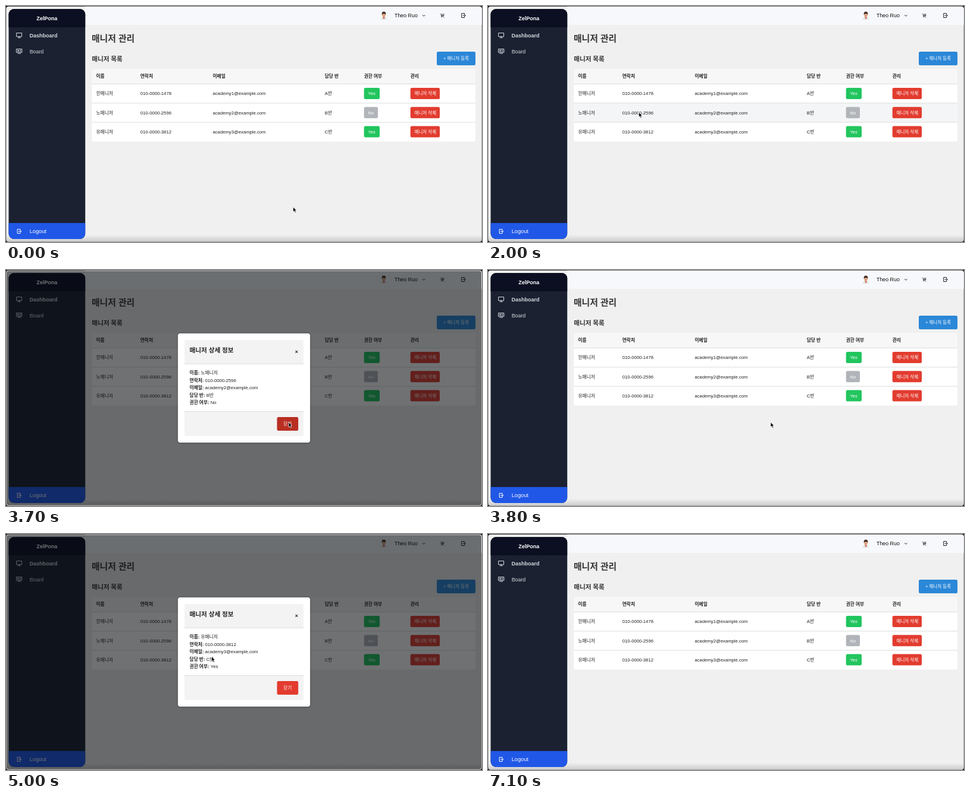
Recreate the animation shown at these times as an HTML page. Size 800 px wide and 398 px high, loop 7200 ms.

```html
<!DOCTYPE html>
<html lang="ko">
<head>
<meta charset="utf-8">
<title>매니저 관리</title>
<style>
  html, body { margin: 0; width: 100%; height: 100%; overflow: hidden; background: #000; }
  svg { display: block; width: 100vw; height: 100vh; }
  text { font: 7.7px "Liberation Sans", "Noto Sans CJK KR", "Noto Sans CJK", sans-serif; fill: #222; white-space: pre; }
  .bold { font-weight: 700; }
  .title { font-size: 14.8px; fill: #333; }
  .sub { font-size: 10.6px; }
  .nav { font-size: 9px; fill: #d3d8e0; }
  .user { font-size: 8.85px; fill: #111; }
  .btn { font-size: 7.5px; font-weight: 500; fill: #fff; }
  .line { stroke: #dcdcdc; stroke-width: 1; }
  .icon { fill: none; stroke-width: 1; stroke-linejoin: round; stroke-linecap: round; }
  #modal { visibility: hidden; }
  #box { filter: drop-shadow(0 1px 2px rgba(0, 0, 0, .15)); }
</style>
</head>
<body>
<svg viewBox="0 0 800 398" preserveAspectRatio="none">
  <defs>
    <linearGradient id="shade" x2="0" y2="1">
      <stop offset="0" stop-color="#000" stop-opacity="0"/>
      <stop offset="1" stop-color="#000" stop-opacity=".16"/>
    </linearGradient>
    <clipPath id="window"><rect x=".3" y=".7" width="799.4" height="397" rx="4"/></clipPath>
    <clipPath id="side"><rect x="4.5" y="5" width="128.7" height="388" rx="9"/></clipPath>
    <clipPath id="table"><rect x="144.5" y="106" width="644.5" height="122.5" rx="4"/></clipPath>
    <g id="exit" class="icon">
      <path d="M2-2V-3.5H-2.9V3.5H2V2M-.7 0H3.5M2.1-1.5 3.5 0 2.1 1.5"/>
    </g>
  </defs>

  <g clip-path="url(#window)">
    <rect width="800" height="398" fill="#f0f0f0"/>
    <rect x="133" width="667" height="32" fill="#f7f8fb"/>
    <rect y="386" width="800" height="12" fill="url(#shade)"/>

    <g clip-path="url(#side)">
      <rect width="134" height="398" fill="#1b2130"/>
      <rect width="134" height="36" fill="#0b0f21"/>
      <rect y="366" width="134" height="32" fill="#2057e7"/>
    </g>
    <text class="nav bold" x="68.8" y="23.8" text-anchor="middle" style="fill:#fff">ZelPona</text>
    <text class="nav bold" x="39.5" y="52.8">Dashboard</text>
    <text class="nav" x="39.7" y="79.7" style="font-size:8.85px">Board</text>
    <text class="nav" x="39.7" y="383.2" style="font-size:9.2px;fill:#fff">Logout</text>
    <g class="icon" stroke="#d3d8e0">
      <path d="M18 45.5H26.5V51.5H18ZM22.2 51.5V53.5M20 53.5H24.5"/>
      <path d="M17.8 72.5H26.8V78.3H17.8ZM20 74.5H21.5V76.3H20ZM23.3 74.4H25M23.3 76.4H25M20 80H24.6"/>
    </g>
    <use href="#exit" x="22" y="380" stroke="#fff"/>

    <path d="M629.8 22.7Q630 18.7 635 18.7T640.2 22.7Z" fill="#dfe6e4"/>
    <path d="M633.2 18.6H636.8L635 22.8Z" fill="#c9584c"/>
    <ellipse cx="635" cy="15.2" rx="2.8" ry="3.6" fill="#dfa581"/>
    <path d="M631.8 15Q630.8 9.4 635 9.4T638.2 15Q637.8 13 635 13.1T631.8 15Z" fill="#3f2f28"/>
    <text class="user" x="653" y="19.3">Theo Ruo</text>
    <g class="icon" stroke="#222">
      <path d="M700.4 15.3 702.3 17.2 704.2 15.3"/>
      <path d="M730 13 736.2 19.2M733.4 13 732.6 14.1M736 13.2 733.6 15.3H736.4L735.2 16.8M731 16H732.8L731.8 19 733.4 17.6" stroke-width=".85"/>
    </g>
    <use href="#exit" x="768.6" y="16" stroke="#222"/>

    <text class="title bold" x="144" y="59.6">매니저 관리</text>
    <text class="title sub bold" x="144.2" y="92.5">매니저 목록</text>
    <rect x="724" y="77" width="65" height="23" rx="2.5" fill="#2b87d8"/>
    <text class="btn" x="735" y="91.2">+ 매니저 등록</text>

    <g clip-path="url(#table)">
      <rect x="144" y="106" width="646" height="123" fill="#fff"/>
      <rect x="144" y="106" width="646" height="25.5" fill="#f7f7f7"/>
      <g id="rows"></g>
    </g>
  </g>

  <g id="modal">
    <rect x="1" y="1.4" width="798" height="395.4" rx="4" fill="#080c0e" fill-opacity=".58"/>
    <rect id="box" x="289" y="107" width="222" height="184" rx="4" fill="#fff"/>
    <path d="M300 118H500V158H300ZM300 239H500V280H300Z" fill="#f3f3f3"/>
    <path class="line" d="M300 158.3H500M300 238.7H500"/>
    <text class="sub bold" x="308.5" y="139.2">매니저 상세 정보</text>
    <text class="bold" x="488.3" y="141" text-anchor="middle" style="font-size:8.8px">×</text>
    <g id="info"></g>
    <rect id="close" x="455.5" y="248" width="35.7" height="23" rx="2.5"/>
    <text class="btn" x="473.3" y="262.4" text-anchor="middle" style="font-size:7.7px">닫기</text>
  </g>

  <path id="cursor" d="M0 0V8.2L1.9 6.5 3.3 9.6 4.8 8.9 3.4 5.9H6Z" fill="#000" stroke="#fff" stroke-width=".7"/>
</svg>

<script>
const LOOP = 7200, STEP = 100;
const heads = ["이름", "연락처", "이메일", "담당 반", "권한 여부", "관리"];
const cols = [151.5, 225.8, 347.5, 535.8, 601.7, 679.7];
const people = [
  ["한매니저", "010-0000-1478", "academy1@example.com", "A반", "Yes"],
  ["노매니저", "010-0000-2596", "academy2@example.com", "B반", "No"],
  ["유매니저", "010-0000-3812", "academy3@example.com", "C반", "Yes"]
];
const ROW_TOP = 131.5, ROW_H = 32.3;
// open time, close time, person shown
const visits = [[2100, 3800, 1], [4900, 6200, 2]];
// start, end, then where the pointer goes
const moves = [
  [400, 1800, 253.5, 179.3],
  [2500, 3500, 475, 256.8],
  [3900, 4700, 345.5, 206.8],
  [5100, 5900, 474, 260.3],
  [6300, 7000, 480, 408]
];
const $ = id => document.getElementById(id);
const text = (x, y, s, cls = "") => `<text class="${cls}" x="${x}" y="${y}">${s}</text>`;
const button = (x, y, w, color, label) =>
  `<rect x="${x}" y="${y - 9.5}" width="${w}" height="19" rx="2.5" fill="${color}"/>` +
  text(x + 6.8, y + 2.8, label, "btn");

function row(p, i) {
  const top = ROW_TOP + i * ROW_H, mid = top + 16;
  const yes = p[4] === "Yes";
  return `<rect class="row" x="144" y="${top}" width="646" height="${ROW_H}"/>` +
    `<path class="line" d="M144 ${top}H790"/>` +
    p.slice(0, 4).map((s, c) => text(cols[c], mid + 2.8, s)).join("") +
    button(cols[4], mid, yes ? 26.3 : 23.3, yes ? "#22c55e" : "#b1b5ba", p[4]) +
    button(cols[5], mid, 49.3, "#e23c2f", "매니저 삭제");
}

$("rows").innerHTML = people.map(row).join("") +
  heads.map((s, c) => text(cols[c], 121.2, s, "bold")).join("");
const rows = document.querySelectorAll(".row");

const details = p => p.map((s, i) =>
  text(308.6, 176.3 + i * 12.45, `<tspan class="bold">${heads[i]}:</tspan> ${s}`)).join("");

const ease = u => u * u * (3 - 2 * u);

function pointer(t) {
  let x = 482.5, y = 339;
  for (const [from, to, tx, ty] of moves) {
    const k = ease(Math.min(1, Math.max(0, (t - from) / (to - from))));
    x += (tx - x) * k;
    y += (ty - y) * k;
  }
  return [x, y];
}

let shown = -1;
function draw(now) {
  const t = Math.floor(now % LOOP / STEP) * STEP;
  const [x, y] = pointer(t);
  const visit = visits.find(v => t >= v[0] && t < v[1]);
  $("cursor").setAttribute("transform", `translate(${x} ${y})`);
  $("modal").style.visibility = visit ? "visible" : "hidden";
  if (visit && shown !== visit[2]) {
    shown = visit[2];
    $("info").innerHTML = details(people[shown]);
  }
  const over = x > 455 && x < 491 && y > 248 && y < 271;
  $("close").setAttribute("fill", over ? "#b92e22" : "#e23c2f");
  const hover = visit ? -1 : Math.floor((y - ROW_TOP) / ROW_H);
  rows.forEach((r, i) => r.setAttribute("fill", i === hover ? "#f4f5f6" : "#fff"));
}

const start = performance.now();
(function tick() {
  draw(performance.now() - start);
  requestAnimationFrame(tick);
})();
</script>
</body>
</html>
```
